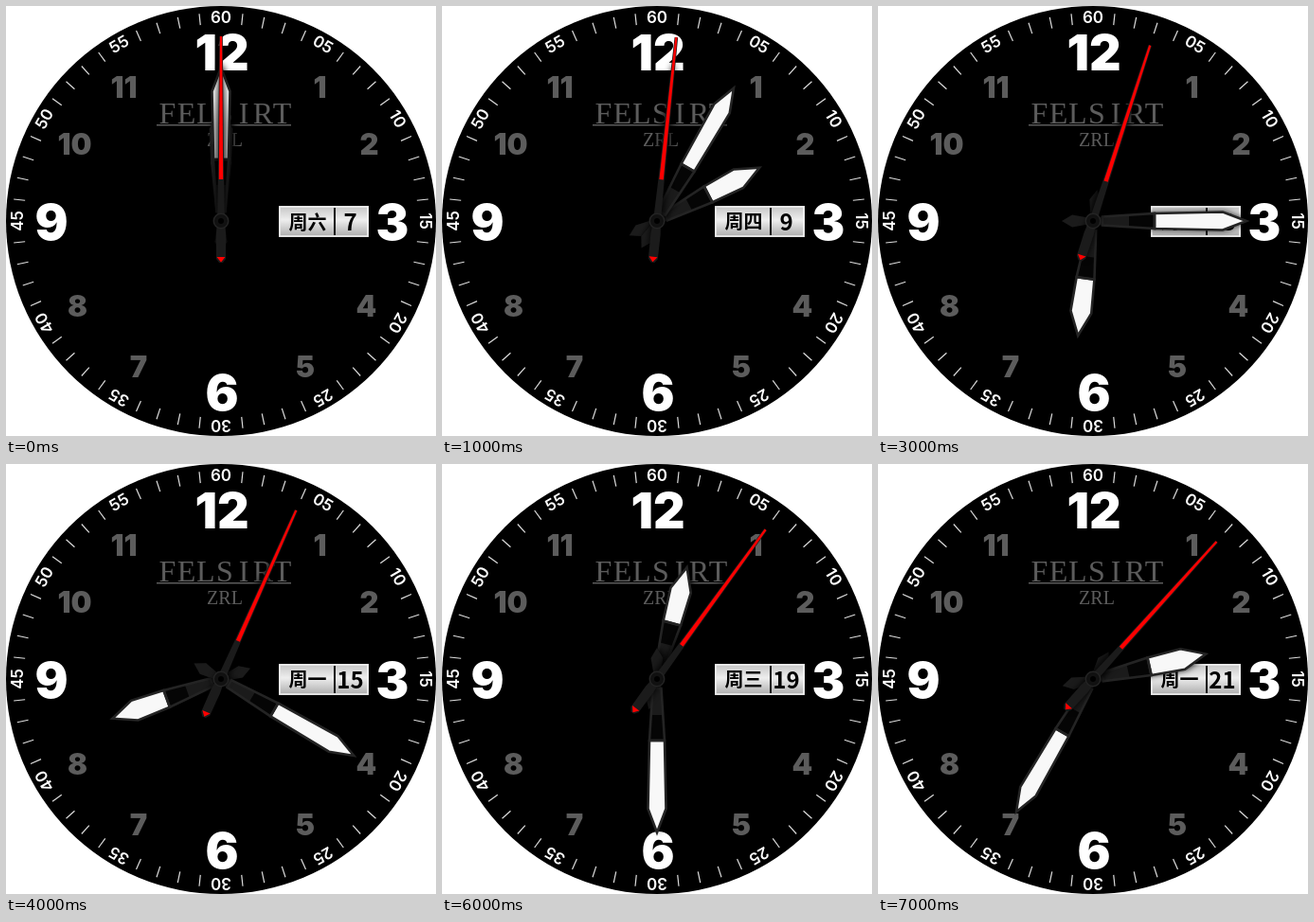
An HTML page with a canvas that plays this animation: 454x454 px, repeating every 8 s.

```html
<!DOCTYPE html>
<html lang="zh">
<head>
<meta charset="utf-8">
<style>
html, body { margin: 0; width: 454px; height: 454px; overflow: hidden; background: #fff; }
canvas { display: block; }
</style>
</head>
<body>
<canvas id="face" width="454" height="454"></canvas>
<script>
const ctx = document.getElementById('face').getContext('2d');
const C = 227, DEG = Math.PI / 180;
const SANS = 'Inter, "Open Sans", sans-serif';
const SERIF = '"Liberation Serif", "Noto Serif", serif';
const CJK = '"Noto Sans CJK SC", "Noto Sans CJK JP", "Noto Sans CJK", sans-serif';
const GREY = '#5c5c5c', EDGE = '#242424', BODY = '#1b1b1b';

// Text centred on its own ink height
function label(text, x, y, font, color) {
  ctx.font = font;
  ctx.fillStyle = color;
  ctx.textAlign = 'center';
  const m = ctx.measureText(text);
  ctx.fillText(text, x, y + (m.actualBoundingBoxAscent - m.actualBoundingBoxDescent) / 2);
}

function spaced(text, y, pitch, size) {
  ctx.font = `${size}px ${SERIF}`;
  ctx.fillStyle = GREY;
  ctx.textAlign = 'center';
  [...text].forEach((ch, i) => ctx.fillText(ch, 231 + pitch * (i - (text.length - 1) / 2), y));
}

// Filled shape from its right half, mirrored around the vertical axis
function mirrored(half, fill) {
  ctx.beginPath();
  [...half, ...half.map(([x, y]) => [-x, y]).reverse()].forEach(([x, y]) => ctx.lineTo(x, y));
  ctx.closePath();
  ctx.fillStyle = fill;
  ctx.fill();
}

function disc(x, y, r, fill) {
  ctx.fillStyle = fill;
  ctx.beginPath();
  ctx.arc(x, y, r, 0, 2 * Math.PI);
  ctx.fill();
}

function turned(angle, draw) {
  ctx.save();
  ctx.translate(C, C);
  ctx.rotate(angle * DEG);
  draw();
  ctx.restore();
}

function drawHour(hour) {
  const angle = hour * 30 * DEG;
  const major = hour % 3 === 0;
  // Upper numerals lean outwards, away from the 12
  const lean = 8 * DEG * Math.max(0, Math.cos(angle)) ** 2 * Math.sign(Math.sin(angle));
  const radius = major ? 180 : 176;
  const font = major ? `900 52px ${SANS}` : `900 31px ${SANS}`;
  label(hour || 12, 228 + radius * Math.sin(angle + lean), 228 - radius * Math.cos(angle + lean),
    font, major ? '#fff' : GREY);
}

function drawMinute(minute) {
  turned(minute * 6, () => {
    if (minute % 5) {
      ctx.fillStyle = '#ddd';
      ctx.fillRect(-0.6, -220, 1.2, 12);
    } else {
      label(String(minute).padStart(2, '0'), 0, -216, `600 17px ${SANS}`, '#fff');
    }
  });
}

function drawDial() {
  ctx.fillStyle = '#fff';
  ctx.fillRect(0, 0, 2 * C, 2 * C);
  disc(C, C, C, '#000');
  for (let minute = 1; minute <= 60; minute++) drawMinute(minute);
  for (let hour = 0; hour < 12; hour++) drawHour(hour);
  spaced('FELSIRT', 124, 20.2, 32);
  ctx.fillRect(159, 125, 142, 1.5);
  spaced('ZRL', 148, 12.8, 20);
}

// Month advances by one and day by two on every step
function drawCalendar(step) {
  const date = new Date(2023, step, 7 + 2 * step);
  const metal = ctx.createLinearGradient(0, 211, 0, 244);
  metal.addColorStop(0, '#c4c4c4');
  metal.addColorStop(0.45, '#eee');
  metal.addColorStop(1, '#aaa');
  ctx.fillStyle = metal;
  ctx.fillRect(288, 211, 95, 33);
  ctx.strokeStyle = '#f4f4f4';
  ctx.lineWidth = 1.5;
  ctx.strokeRect(289, 212, 93, 31);
  ctx.fillStyle = '#111';
  ctx.fillRect(346, 213, 2, 29);
  label('周' + '日一二三四五六'[date.getDay()], 318.5, 227.5, `900 20px ${CJK}`, '#000');
  label(date.getDate(), 363.5, 227.5, `bold 24px ${CJK}`, '#000');
}

function drawHand(angle, tip, shoulder, start, wide, narrow) {
  turned(angle, () => {
    const blade = [[0, -tip], [wide, -shoulder], [narrow, -start]];
    const tail = [[4, 8], [6.5, 22], [0, 33]];
    ctx.shadowColor = '#000';
    ctx.shadowBlur = 7;
    ctx.shadowOffsetX = 2;
    mirrored([...blade, [4.5, -10], ...tail], '#050505');
    ctx.shadowColor = 'transparent';
    mirrored([[narrow * 0.8, -38], [4.5, -10], ...tail], BODY);
    mirrored(blade, '#f8f8f8');
    ctx.lineWidth = 2.6;
    ctx.strokeStyle = EDGE;
    ctx.stroke();
    mirrored([[narrow, -start], [4.5, -10]], 'transparent');
    ctx.stroke();
  });
}

function drawSecondHand(angle) {
  turned(angle, () => {
    ctx.filter = 'blur(3px)';
    mirrored([[2, -165], [6, -100], [7, -44], [6, 40]], 'rgba(0, 0, 0, 0.75)');
    ctx.filter = 'none';
    mirrored([[1.8, -195], [3.2, -44], [4, 0], [5.2, 14], [5, 40], [2, 44]], BODY);
    mirrored([[1.1, -195], [2.2, -44]], '#f00');
    mirrored([[4.5, 38], [0, 43.5], [0, 40]], '#f00');
  });
  disc(C, C, 8.5, EDGE);
  disc(C, C, 7, '#111');
  disc(C, C, 3, '#000');
}

function render() {
  const step = Math.floor(performance.now() % 8000 / 1000);
  drawDial();
  drawCalendar(step);
  drawHand(step * 62.5, 122, 97, 61, 11, 9.5);
  drawHand(step * 30, 162, 137, 65, 9.5, 8);
  drawSecondHand(step * 6);
  requestAnimationFrame(render);
}
render();
</script>
</body>
</html>
```
